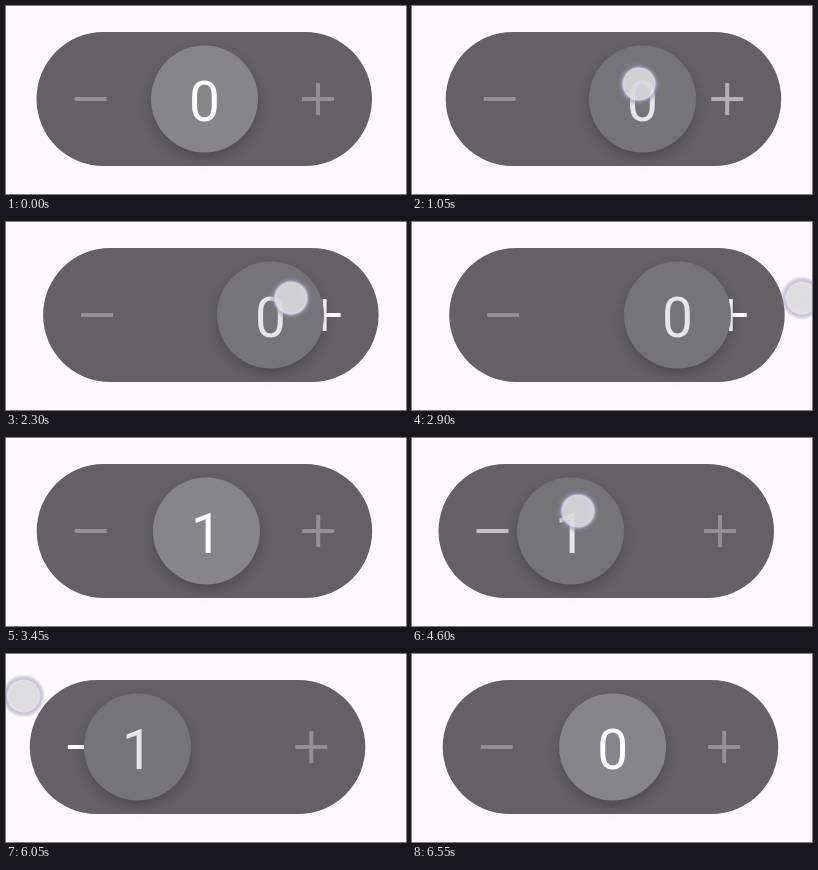
These frames come from a looping animation (400 by 188 pixels, 6600 ms). An HTML page:

```html
<!DOCTYPE html>
<html lang="en">
<head>
<meta charset="utf-8">
<title>Drag counter</title>
<style>
  html, body { margin: 0; width: 100%; height: 100%; overflow: hidden; background: #fcfafe; }
  svg { display: block; width: 400px; height: 188px; }
  text { font: 400 55px Roboto, sans-serif; text-anchor: middle; fill: #fff; }
  .icon { fill: none; stroke: #fff; stroke-width: 4; }
</style>
</head>
<body>
<svg viewBox="0 0 400 188">
  <defs>
    <radialGradient id="touch">
      <stop offset="0" stop-color="#d9d8da" stop-opacity=".9"/>
      <stop offset=".6" stop-color="#dbdadd" stop-opacity=".9"/>
      <stop offset=".72" stop-color="#e0ddea" stop-opacity=".9"/>
      <stop offset=".79" stop-color="#a9a4c6" stop-opacity=".65"/>
      <stop offset=".87" stop-color="#8f8aa8" stop-opacity=".35"/>
      <stop offset="1" stop-color="#8f8aa8" stop-opacity="0"/>
    </radialGradient>
    <filter id="blur" x="-40%" y="-40%" width="180%" height="180%">
      <feGaussianBlur stdDeviation="7"/>
    </filter>
  </defs>
  <g id="pill">
    <rect x="30.5" y="26" width="335.5" height="134" rx="67" fill="#636164"/>
    <path id="minus" class="icon" d="M68.5 93h32"/>
    <path id="plus" class="icon" d="M296 93h32M312 77v32"/>
  </g>
  <g id="knob">
    <circle cx="198.5" cy="99" r="52" fill="#000" opacity=".26" filter="url(#blur)"/>
    <circle id="face" cx="198.5" cy="93" r="53.5"/>
    <text id="digit" x="198.5" y="115">0</text>
  </g>
  <circle id="cursor" r="22" fill="url(#touch)"/>
</svg>
<script>
const LOOP = 6600, STEP = 50, REACH = 67;

// Each drag: keys of [time, knob offset, cursor x, cursor y], ending at the release.
const drags = [
  [[600, 0, 197, 80], [1050, 32, 227, 78], [1300, 39, 235, 78], [1950, 53, 256, 77],
   [2300, 66, 285, 76], [2650, 67, 364, 76], [2900, 67, 390, 76]],
  [[3950, 0, 205, 77], [4600, -40, 166, 73], [5350, -66, 126, 62],
   [5500, -67, 118, 59], [6080, -67, 12, 41]]
];

const el = id => document.getElementById(id);
const clamp = v => Math.max(0, Math.min(1, v));
const shift = (node, x, y = 0) => node.setAttribute('transform', `translate(${x} ${y})`);
const [pill, knob, face, digit, minus, plus, cursor] =
  ['pill', 'knob', 'face', 'digit', 'minus', 'plus', 'cursor'].map(el);

function sample(keys, t) {
  let i = 1;
  while (i < keys.length - 1 && t > keys[i][0]) i++;
  const a = keys[i - 1], b = keys[i];
  const p = clamp((t - a[0]) / (b[0] - a[0]));
  return a.map((v, n) => v + (b[n] - v) * p);
}

// Underdamped return to the centre, s in seconds
function spring(s) {
  const k = 5.25, w = 10.3;
  return Math.exp(-k * s) * (Math.cos(w * s) + k / w * Math.sin(w * s));
}

const glow = x => 0.3 + 0.7 * clamp(x / REACH) ** 1.6;

function draw(t) {
  const keys = t < 3950 ? drags[0] : drags[1];
  const start = keys[0][0], end = keys[keys.length - 1][0];
  let [, x, cx, cy] = sample(keys, t);
  if (t > end) x *= spring((t - end) / 1000);

  const press = clamp((t - start) / 150) * (1 - clamp((t - end) / 250));
  const touch = clamp((t - start) / 100) * (1 - clamp((t - end) / 120));
  const shade = Math.round(134 - 17 * press);

  shift(pill, x * 0.1);
  shift(knob, x);
  shift(cursor, cx, cy);
  cursor.setAttribute('opacity', touch);
  face.setAttribute('fill', `rgb(${shade},${shade - 1},${shade + 1})`);
  digit.setAttribute('opacity', 1 - 0.18 * press);
  digit.textContent = t > 2900 && t <= 6080 ? 1 : 0;
  minus.setAttribute('opacity', glow(-x));
  plus.setAttribute('opacity', glow(x));
}

const origin = performance.now();
function tick() {
  const t = (performance.now() - origin) % LOOP;
  draw(Math.floor(t / STEP) * STEP);
  requestAnimationFrame(tick);
}
tick();
</script>
</body>
</html>
```
